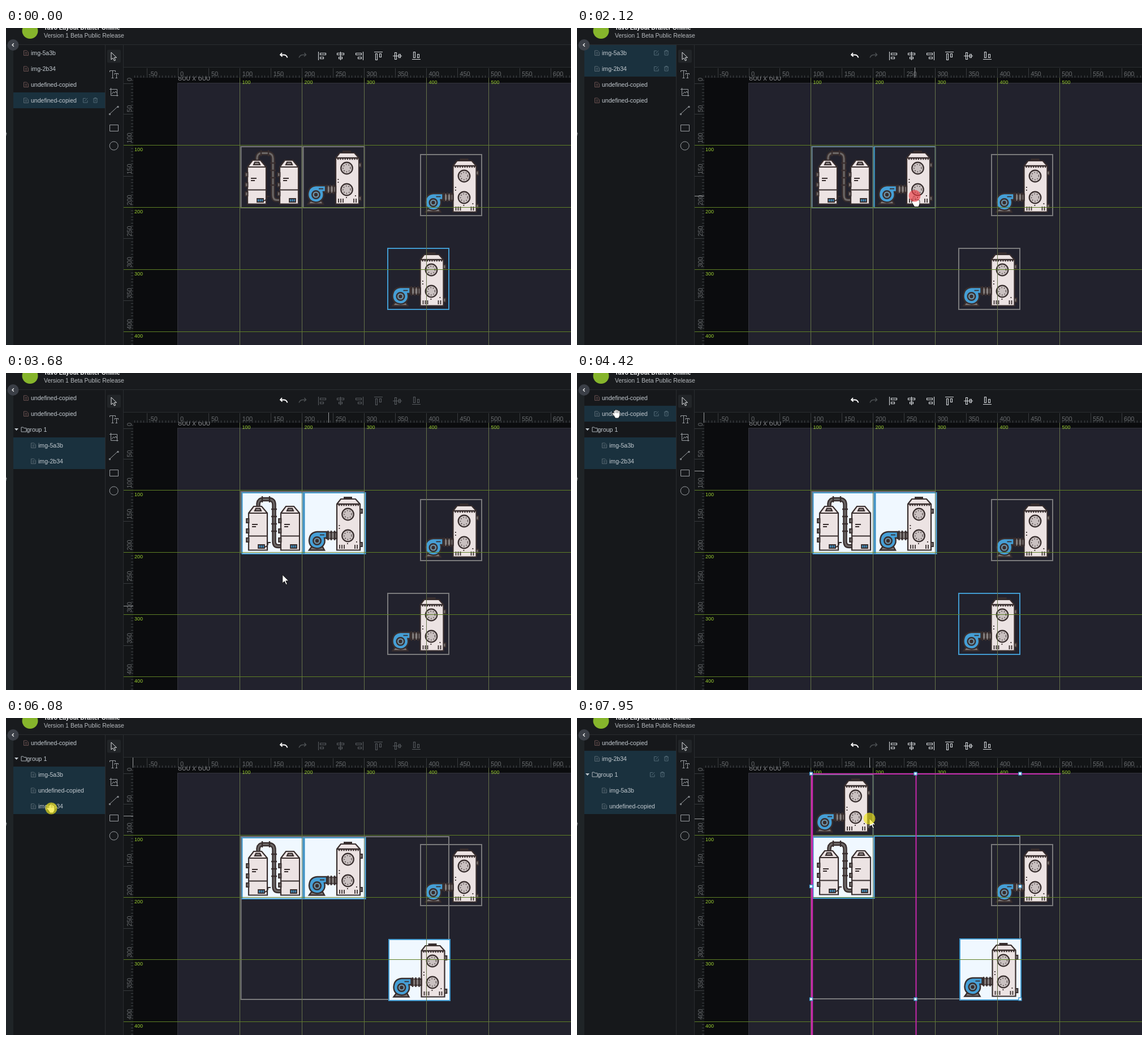
An HTML page for the animation above (8 s loop, 999 by 561 pixels).

```html
<!DOCTYPE html>
<html lang="en">
<head>
<meta charset="utf-8">
<title>Sketch editor</title>
<style>
html,body{margin:0;width:100%;height:100%;overflow:hidden;background:#15171a}
svg{display:block;width:999px;height:561px}
text{font:10.56px "Liberation Sans","Noto Sans CJK TC","Noto Sans CJK",Arial,sans-serif;fill:#c3cad0;white-space:pre}
.num{font-size:11px;fill:#686b6e}
.tag{font-size:9px;fill:#9acd32}
.ln{fill:none;stroke:#d6d9dc;stroke-width:1.1}
.tool{fill:none;stroke:#9a9ea2;stroke-width:1}
</style>
</head>
<body>
<svg id="stage" viewBox="0 0 999 561" xmlns="http://www.w3.org/2000/svg">
<defs>
  <g id="tower" stroke="#382e2e" stroke-width="2.2">
    <path d="M70 8.500H85" stroke-width="3"/>
    <path d="M58 101.500V20L65 11H91L99 20V101.500z" fill="#ece3e3"/>
    <path d="M58 20H99" stroke-width="2.600"/>
    <path d="M61 22H97" stroke-width="2.600" stroke-dasharray="2.200 2"/>
    <g fill="#c9c0c0"><circle cx="77.500" cy="38" r="10.300"/><circle cx="77.500" cy="76" r="10.300"/></g>
    <g fill="none" stroke-width="1.400" stroke-dasharray="1.500 3.200"><circle cx="77.500" cy="38" r="6.500"/><circle cx="77.500" cy="76" r="6.500"/></g>
    <path d="M63 92v7M67 92v7M71 92v7M90 92v7M94 92v7" stroke-width="1.800"/>
    <path d="M61.500 58h1.800M61.500 63h1.800M76 90h1.800M92 87h1.800" stroke-width="1.800"/>
    <path d="M99.500 29h3.500v7h-3.500M99.500 88h3.500v7h-3.500" fill="#6f6a69" stroke-width="1.800"/>
  </g>
  <g id="blower">
    <use href="#tower"/>
    <g stroke="#382e2e" stroke-width="2.400">
      <path d="M40 70H58V81H40z" fill="#7d7878"/>
      <path d="M42.500 67V84M48 67V84M54 67V84" stroke-width="2.400"/>
      <path d="M45 69V82M51 69V82" stroke="#8f8a89" stroke-width="1.200"/>
      <path d="M13 96H33L36 101.500H9z" fill="#7d7878"/>
      <path d="M23 69H40V80H36Q38 88 34 93 30 98.500 23 98.500 9 97 9 84 10 70 23 69z" fill="#459fd6"/>
      <circle cx="23" cy="85" r="6.800" fill="#6d93a8"/>
      <circle cx="23" cy="85" r="2" fill="#382e2e"/>
      <path d="M28 74.500h8" stroke-width="1.800"/>
    </g>
  </g>
  <g id="tank" stroke="#382e2e" stroke-width="2.200">
    <path d="M12 36L21 24H35L45 36V101.500H12z" fill="#ece3e3"/>
    <path d="M12 36H45M12 76.500H45" stroke-width="1.900"/>
    <path d="M23 32l2-4.500h7l2 4.500z" fill="#8d8686"/>
    <path d="M18 56h10M18 60h7" stroke-width="1.800"/>
    <path d="M8 46h4.500v7h-4.500zM8 64h4.500v7h-4.500zM8 80h4.500v7h-4.500z" fill="#6f6a69" stroke-width="1.800"/>
    <path d="M29 92h11v6h-11z" fill="#3d86b5" stroke-width="1.800"/>
    <path d="M33 93v4M36.500 93v4" stroke-width="1"/>
  </g>
  <path id="pipe" d="M29 23V19Q30 11.500 37 11.500H48Q57 12 57 21V86Q57 94.500 64 94.500H70" fill="none"/>
  <g id="plant">
    <use href="#pipe" stroke="#382e2e" stroke-width="7.500"/>
    <use href="#pipe" stroke="#6c6867" stroke-width="3"/>
    <path d="M36 6V17M49 6V17M52 29H62M52 42H62M52 55H62M52 68H62" stroke="#382e2e" stroke-width="2.400"/>
    <use href="#tank"/><use href="#tank" x="57"/>
    <path d="M40 96Q47 95 46 88H51" fill="none" stroke="#382e2e" stroke-width="2"/>
  </g>
</defs>
</svg>
<script>
const NS = "http://www.w3.org/2000/svg", LOOP = 8000;
const stage = document.getElementById("stage");
const timed = [];

function add(parent, tag, attrs = {}, text) {
  const e = document.createElementNS(NS, tag);
  for (const k in attrs) e.setAttribute(k, attrs[k]);
  if (text !== undefined) e.textContent = text;
  parent.appendChild(e);
  return e;
}
const group = (p, a) => add(p, "g", a);
const box = (p, x, y, w, h, fill, more) => add(p, "rect", { x, y, width: w, height: h, fill, ...more });
const path = (p, d, a) => add(p, "path", { d, ...a });
const label = (p, x, y, s, a) => add(p, "text", { x, y, ...a }, s);
const frame = (p, x, y, w, h, stroke) => box(p, x, y, w, h, "none", { stroke, "stroke-width": 2 });
const show = (e, ...spans) => (timed.push([e, spans]), e);
const inside = (spans, t) => spans.some(([a, b]) => t >= a && t < b);

const GREY = "#7a7a7c", BLUE = "#429bd0", STEEL = "#6b8795", PINK = "#c527ab";

// ---- artboard
box(stage, 0, 0, 999, 561, "#17191c");
box(stage, 207, 88, 792, 473, "#0b0c0e");
box(stage, 303.5, 97.5, 696, 464, "#22222d", { stroke: "#33343c" });
label(stage, 304, 93, "800 x 600", { style: "font-size:13px;fill:#7d7f82" });

// ---- items on the artboard
const board = group(stage);
const SIZE = 108;
const SPOT = { plant: [415.5, 210], pump: [525.5, 210], right: [733, 224], low: [675, 390] };

function item(at, art, stroke, ...spans) {
  const [x, y] = SPOT[at], g = show(group(board), ...spans);
  add(g, "use", { href: art, x: x - .5, y });
  frame(g, x, y, SIZE, SIZE, stroke);
  return g;
}
function lit(at, art, dy, ...spans) {
  const [x, y] = SPOT[at], g = show(group(board), ...spans);
  box(g, x + 2, y + 2 + dy, SIZE, SIZE, "#f0f8ff", { stroke: BLUE, "stroke-width": 2 });
  add(g, "use", { href: art, x: x + 1.5, y: y + 2 + dy });
}
const bounds = (x, y, w, h, c, ...spans) => show(frame(board, x, y, w, h, c), ...spans);

bounds(415.5, 210, 218, 108, GREY, [3400, 4850]);
bounds(415.5, 210, 367.5, 288, GREY, [4850, 6200]);
bounds(415.5, 210, 367.5, 288, STEEL, [6200, 7120]);
bounds(415.5, 209, 367.5, 288, GREY, [7120, LOOP]);
show(path(board, "M525 209H783", { stroke: BLUE, "stroke-width": 2 }), [7120, LOOP]);

item("right", "#blower", GREY, [0, LOOP]);
item("plant", "#plant", GREY, [0, 450]);
item("plant", "#plant", STEEL, [450, 3400]);
item("pump", "#blower", GREY, [0, 720]);
item("pump", "#blower", STEEL, [720, 3400]);
show(path(board, "M525.500 210V318", { stroke: "#3292c4", "stroke-width": 2 }), [720, 3400]);
item("low", "#blower", BLUE, [0, 450], [4200, 4850]);
item("low", "#blower", GREY, [450, 4200]);
lit("plant", "#plant", 0, [3400, 7120]);
lit("pump", "#blower", 0, [3400, 7120]);
lit("low", "#blower", 0, [4850, 7120]);
lit("plant", "#plant", -1, [7120, LOOP]);
lit("low", "#blower", -1, [7120, LOOP]);
const moved = item("pump", "#blower", STEEL, [7120, LOOP]);

// ---- rulers and guides
const UNIT = 1.0985, X0 = 304, Y0 = 98;
const rulers = group(stage);
box(rulers, 207, 70, 792, 16, "#131517");
box(rulers, 207, 70, 18, 491, "#131517");
let small = "", big = "";
const snap = v => Math.floor(v) + .5;
for (let v = -70; v <= 635; v += 5) {
  const x = snap(X0 + v * UNIT);
  if (v % 50) small += `M${x} 84V88`; else big += `M${x} 71V88`;
}
for (let v = -5; v <= 420; v += 5) {
  const y = snap(Y0 + v * UNIT);
  if (v % 50) small += `M221 ${y}H225`; else big += `M208 ${y}H225`;
}
path(rulers, small, { stroke: "#404346" });
path(rulers, big, { stroke: "#383b3e" });
for (let v = -50; v <= 600; v += 50)
  label(rulers, v < 0 ? 252 : X0 + v * UNIT + 4, 84.5, v, { class: "num" });
for (let v = 0; v <= 400; v += 50)
  label(rulers, 0, 0, v, { class: "num", transform: `translate(222 ${Y0 + v * UNIT - 4}) rotate(-90)` });
box(rulers, 207, 70, 18, 18, "#131517");

for (let n = 1; n <= 5; n++) {
  const x = snap(X0 + n * 100 * UNIT), y = snap(Y0 + n * 100 * UNIT);
  path(stage, `M${x} 88V561`, { stroke: "#66734a" });
  label(stage, x + 4, 99, n * 100, { class: "tag" });
  if (n < 5) {
    path(stage, `M207 ${y}H999`, { stroke: "#5f8026" });
    label(stage, 227, y + 10.5, n * 100, { class: "tag" });
  }
}
const markX = path(stage, "M0 70V88", { stroke: "#9b9da0" });
const markY = path(stage, "M207 0H225", { stroke: "#9b9da0" });

// ---- snapping lines and handles
const snaps = show(group(stage), [7820, LOOP]);
path(snaps, "M415.500 98V561", { stroke: PINK, "stroke-width": 3.4 });
path(snaps, "M599.500 98V561M414 99H855", { stroke: PINK, "stroke-width": 2 });
const grips = show(group(stage), [7660, LOOP]);
const knobs = [];
for (const gx of [414, 598.5, 783.5]) for (const gy of [0, .5, 1])
  if (gx !== 598.5 || gy !== .5)
    knobs.push([box(grips, gx - 2.5, 0, 5, 5, "#fff", { stroke: "#3d98d0", "stroke-width": 1.3 }), gy]);

// ---- header and side columns
box(stage, 0, 0, 999, 29, "#191b1e");
box(stage, 0, 29, 13, 532, "#1f2427");
box(stage, 13, 30, 162, 531, "#16181b");
box(stage, 176, 30, 31, 531, "#17191c");
box(stage, 207, 30, 792, 40, "#17191c");
path(stage, "M13 29.500H999M175.500 30V561M207.500 30V561M207 69.500H999", { stroke: "#2a2d30" });
add(stage, "circle", { cx: 42.5, cy: 5, r: 14, fill: "#86b52c" });
label(stage, 67, 3, "Tavo Layout Drafter Online", { style: "font-weight:700;fill:#f0f1f2" });
label(stage, 67, 17, "Version 1 Beta Public Release", { style: "fill:#b6babe" });
path(stage, "M0 184.500V190.500M0 187H1.500", { stroke: "#b5b8bb" });

// ---- vertical tools
box(stage, 179, 38.5, 24, 23, "#222528", { rx: 2 });
const tools = group(stage, { class: "tool" });
path(tools, "M186 43V56L189 53.200 191.500 58 193.500 57 191.300 52.300H195.500z", { stroke: "#dfe1e3" });
path(tools, "M183.500 78V75.500H193.500V78M188.500 75.500V88.500M186.500 88.500H190.500M192 82.500V80.500H198.500V82.500M195.500 80.500V88.500M193.500 88.500H197");
path(tools, "M185.500 106V119.500H198.500M183 108.500H196.500V121M187 117L190 113 192 115 194 112 196 115");
path(tools, "M184 151.500L197.500 139");
path(tools, "M182.500 151.500h2v2h-2zM197 138.500h2v2h-2z");
path(tools, "M183.500 171.500H198.500V182.500H183.500z");
add(tools, "circle", { cx: 190.7, cy: 208.5, r: 7.5 });

// ---- top toolbar
const bar = group(stage, { class: "ln" });
path(bar, "M488 44L485 47.500 488.500 50.500M485.500 47.500H491Q496 47.500 497.500 52.500", { stroke: "#fff", "stroke-width": 1.8 });
path(bar, "M527.500 44L530.500 47.500 527 50.500M530 47.500H525Q520 47.500 518 52.500", { stroke: "#4c5053", "stroke-width": 1.5 });
const align = group(bar);
path(align, "M552.500 42V57M555.500 44.500H565.500V47.500H555.500zM555.500 51.500H561.500V54.500H555.500z");
path(align, "M591.500 42V57M585.500 44.500H597.500V47.500H585.500zM588.500 51.500H594.500V54.500H588.500z");
path(align, "M631.500 42V57M618.500 44.500H628.500V47.500H618.500zM622.500 51.500H628.500V54.500H622.500z");
path(align, "M651 42.500H666M653.500 45.500H656.500V56.500H653.500zM660.500 45.500H663.500V51.500H660.500z");
path(align, "M684 49.500H700M687.500 43.500H690.500V55.500H687.500zM694.500 46.500H697.500V52.500H694.500z");
path(align, "M718 55.500H733M720.500 42.500H723.500V52.500H720.500zM727.500 46.500H730.500V52.500H727.500z");

// ---- layer list
const UC = "undefined-copied", A = "img-5a3b", B = "img-2b34", G = "group 1";
// row flags: c child, g group, h highlighted, i row icons
const LISTS = [
  [0, 450, [A, ""], [B, ""], [UC, ""], [UC, "hi"]],
  [450, 720, [A, "hi"], [B, ""], [UC, ""], [UC, ""]],
  [720, 3400, [A, "hi"], [B, "hi"], [UC, ""], [UC, ""]],
  [3400, 4000, [UC, ""], [UC, ""], [G, "g"], [A, "ch"], [B, "ch"]],
  [4000, 4850, [UC, ""], [UC, "hi"], [G, "g"], [A, "ch"], [B, "ch"]],
  [4850, 7120, [UC, ""], [G, "g"], [A, "ch"], [UC, "ch"], [B, "ch"]],
  [7120, 7660, [UC, ""], [B, "hi"], [G, "g"], [A, "ch"], [UC, "ch"]],
  [7660, LOOP, [UC, ""], [B, "hi"], [G, "ghi"], [A, "ch"], [UC, "ch"]]
];
for (const [from, to, ...rows] of LISTS) {
  const list = show(group(stage), [from, to]);
  rows.forEach(([name, f], i) => {
    const has = c => f.includes(c), y = 44 + i * 28, x = has("c") ? 57 : 44;
    if (has("h")) box(list, 13, y - 14, 162, 28, "#1a313e");
    if (has("g")) {
      path(list, `M15 ${y - 2}h7l-3.500 4z`, { fill: "#c3cad0" });
      path(list, `M27 ${y + 4}v-8h3.500l1 1.500h4.500v6.500z`, { fill: "none", stroke: "#aab1b7" });
    } else {
      const c = has("h") ? "#586872" : "#6a5150";
      path(list, `M${x - 12.500} ${y - 4}h5l3 3v5.500h-8zM${x - 10.500} ${y - .500}h4M${x - 10.500} ${y + 2}h4`, { fill: "none", stroke: c });
    }
    label(list, has("g") ? 36.5 : x, y + 3.7, name);
    if (has("i")) {
      const e = has("g") ? 133 : 140;
      path(list, `M${e + 1} ${y - 3.500}h-4.500v7.500h7.500v-4M${e - 1} ${y + 1.500}l5 -5.500M${e + 14} ${y - 3}h8M${e + 16.500} ${y - 3}v-1.500h3v1.500M${e + 15} ${y - 3}v7h6v-7M${e + 18} ${y - 1}v3`,
        { fill: "none", stroke: "#526a77" });
    }
  });
}
add(stage, "circle", { cx: 12.5, cy: 30, r: 10, fill: "#3b3f47" });
path(stage, "M13.800 27.200L11 30 13.800 32.800", { fill: "none", stroke: "#f4f4f4", "stroke-width": 1.3 });

// ---- context menu
const menu = show(group(stage, { style: "filter:drop-shadow(0 2px 4px #0008)" }), [2180, 3400]);
box(menu, 597, 297, 167.5, 270, "#17181a");
const ROWS = [
  [312, "移到上一層", "Ctrl+]"], [333, "移到最上層", "Ctrl+Shift+]"],
  [354, "移到下一層", "Ctrl+["], [375, "移到最下層", "Ctrl+Shift+["],
  [406, "複製", "Ctrl+C", 1], [427, "貼上", "Ctrl+V", 1],
  [458, "組成群組", "Ctrl+G"], [479, "解散群組", "Ctrl+Shift+G", 1],
  [500, "隱藏", "Ctrl+H"], [521, "顯示", "Ctrl+Shift+H"], [552, "刪除", "Delete"]
];
const hover = box(menu, 597, 0, 167.5, 21, "#5086e8");
path(menu, "M597 390.500H764M597 442.500H764M597 536.500H764", { stroke: "#343638" });
const keys = ROWS.map(([y, name, key, off]) => {
  const style = `fill:${off ? "#55585a" : "#dcdee0"}`;
  label(menu, 610.5, y + 4, name, { style });
  return label(menu, 751, y + 4, key, { "text-anchor": "end", style: off ? style : "fill:#b4b7b9" });
});

// ---- pointer
const PATH = [
  [70, 952, 541], [350, 480, 280], [500, 480, 280], [700, 604, 306], [840, 610, 313], [910, 596, 300],
  [1120, 597, 297], [1440, 597, 297], [1580, 609, 307], [1720, 597, 297], [2450, 597, 297],
  [3210, 643, 462], [3480, 643, 462], [4070, 70, 72], [4420, 70, 72], [4850, 80, 128],
  [5280, 82, 128], [5680, 108, 108], [6080, 80, 160], [6490, 80, 160], [6940, 112, 72],
  [7460, 112, 72], [7660, 627, 288], [7880, 517, 178], [LOOP, 517, 178]
];
function at(t) {
  if (t <= PATH[0][0]) return PATH[0].slice(1);
  const i = PATH.findIndex(p => p[0] >= t), [t0, x0, y0] = PATH[i - 1], [t1, x1, y1] = PATH[i];
  let k = (t - t0) / (t1 - t0);
  k = k * k * (3 - 2 * k);
  return [x0 + (x1 - x0) * k, y0 + (y1 - y0) * k];
}
const pointer = show(group(stage), [70, LOOP]);

const arrow = show(group(pointer), [70, 1990], [2180, 3950], [7080, LOOP]);
path(arrow, "M0 0V15L3.600 11.800 6.200 17.600 8.600 16.500 6 10.900H11z", { fill: "#fff", stroke: "#111" });
function hand(d, ...spans) {
  const g = show(group(pointer), ...spans);
  for (const [c, w] of [["#111", 3.6], ["#fff", 2]])
    path(g, d, { fill: "#fff", stroke: c, "stroke-width": w, "stroke-linecap": "round", "stroke-linejoin": "round" });
}
hand("M-1 2V9M2.500 9V7M5.500 9V8M-1 9H7.500V14L6 18H.500L-4 11 -2 10z", [1990, 2180]);
hand("M-3.500 0V-4.500M-1 0V-6M1.700 0V-5.500M4.300 0V-4M-3.500 3L-6.500 -.500M-3.500 0H4.500V3L2.500 6.500H-1.500L-3.500 3z", [3950, 7080]);

// click halos tint the pointer beneath them
const dot = (fill, ...spans) => show(add(pointer, "circle", { r: 10.5, fill, opacity: .66 }), ...spans);
dot("#f3e81c", [400, 510], [680, 780], [3270, 3450], [4130, 4270], [4480, 4900], [6040, 6940], [7650, LOOP]);
dot("#ea3a42", [1990, 2180]);

const DIM = [[3450, 4200], [5500, 6200], [7120, 7600]];
const move = (e, x, y) => e.setAttribute("transform", `translate(${x} ${y})`);

function draw(t) {
  for (const [e, spans] of timed) e.style.display = inside(spans, t) ? "" : "none";
  align.setAttribute("stroke", inside(DIM, t) ? "#565a5e" : "#d6d9dc");

  const [x, y] = at(t);
  move(pointer, x, y);

  let [mx, my] = at(t - 70);
  if (t >= 2180 && t < 3400) [mx, my] = [597, 297];
  else if (mx < 225) [mx, my] = [224, 173];
  move(markX, snap(mx), 0);
  move(markY, 0, snap(my));
  markX.style.display = markY.style.display = t < 70 ? "none" : "";

  const row = ROWS.findIndex(r => Math.abs(r[0] - y) <= 10.5);
  const hot = t > 2450 && row >= 0 && !ROWS[row][3];
  hover.style.display = hot ? "" : "none";
  if (hot) hover.setAttribute("y", ROWS[row][0] - 10.5);
  keys.forEach((k, i) => k.style.opacity = hot && i === row ? .4 : 1);

  const drag = t >= 7660;
  move(moved, drag ? x - 627 : 0, drag ? y - 288 : 0);
  const top = drag ? Math.min(208, 208 + y - 288 + .5) : 208;
  for (const [k, f] of knobs) k.setAttribute("y", top + (497.5 - top) * f - 2.5);
}
function tick() {
  draw(performance.now() % LOOP);
  requestAnimationFrame(tick);
}
tick();
</script>
</body>
</html>
```
